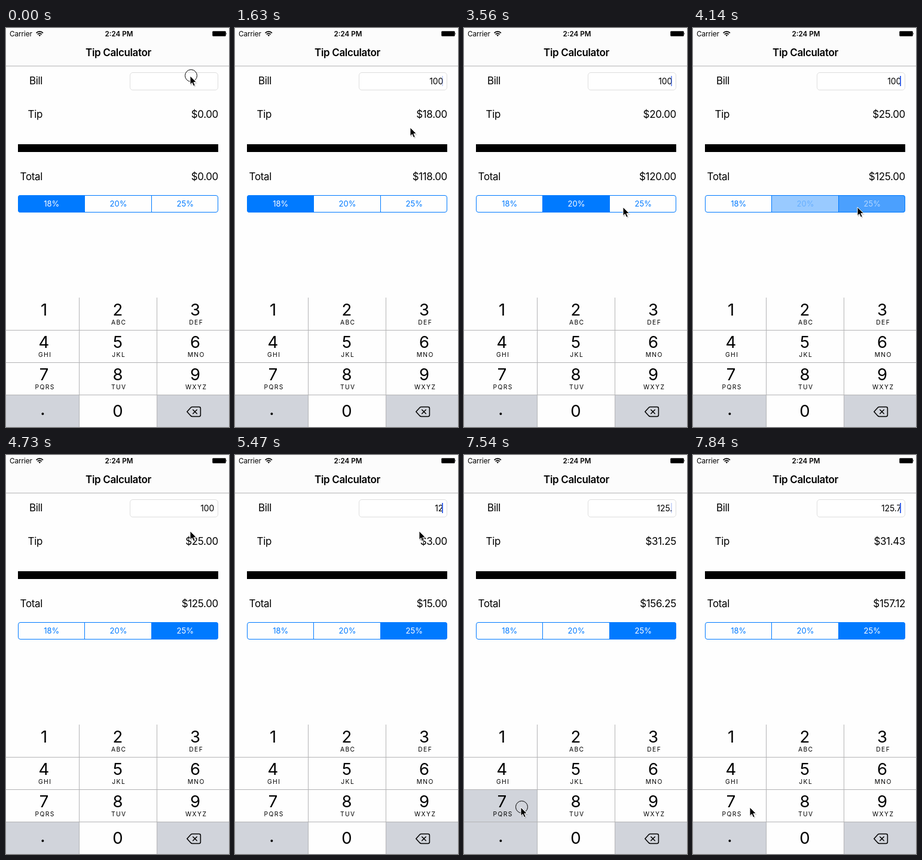
An HTML page that plays this animation: 373x666 px, repeating every 7990 ms.

```html
<!DOCTYPE html>
<html lang="en">
<head>
<meta charset="utf-8">
<title>Tip Calculator</title>
<style>
  html, body { margin: 0; width: 100%; height: 100%; overflow: hidden; background: #fefefe; }
  svg { display: block; width: 373px; height: 666px; }
  text { font-family: Inter, Roboto, sans-serif; }
  .label { font-size: 17px; letter-spacing: -.35px; text-anchor: end; }
  .bill { font-size: 14px; letter-spacing: -.1px; text-anchor: end; }
  .seg, .digit, .abc { text-anchor: middle; }
  .seg { font-size: 13px; }
  .digit { font-size: 27.5px; }
  .abc { font-size: 10.3px; letter-spacing: 1.4px; }
  .line { fill: none; stroke: #b4b4b6; }
</style>
</head>
<body>
<svg viewBox="0 0 373 666">
  <rect width="373" height="666" fill="#fefefe"/>

  <rect width="373" height="63" fill="#fcfcfc"/>
  <path class="line" d="M0 63.5H373"/>
  <text x="6" y="13.5" font-size="11.8" letter-spacing="-.1">Carrier</text>
  <g fill="none" stroke="#000" stroke-width="1.7">
    <path d="M50.6 8.3a8 8 0 0 1 11.3 0M52.8 10.6a4.8 4.8 0 0 1 6.9 0"/>
    <path d="M56.25 14l-1.9-1.9a2.7 2.7 0 0 1 3.8 0z" fill="#000" stroke="none"/>
  </g>
  <text x="189" y="13.5" font-size="11.6" font-weight="600" text-anchor="middle">2:24 PM</text>
  <rect x="345.5" y="5.5" width="22" height="8" rx="1" stroke="#000" stroke-opacity=".5"/>
  <path d="M368.3 7.7q1.6 1.8 0 3.6z"/>
  <text x="188" y="47" font-size="17" font-weight="600" letter-spacing="-.35" text-anchor="middle">Tip Calculator</text>

  <text class="label" x="61" y="94">Bill</text>
  <text class="label" x="61" y="150">Tip</text>
  <text class="label" x="61" y="254">Total</text>
  <rect x="207.5" y="74.5" width="147" height="29" rx="4.5" fill="#fff" stroke="#dedede"/>
  <text class="bill" id="bill" x="348.3" y="94"></text>
  <rect id="caret" x="346" y="80" width="2" height="17" fill="#4169e8"/>
  <text class="label" id="tip" x="355" y="150"></text>
  <text class="label" id="total" x="355" y="254"></text>
  <rect x="20" y="194" width="335" height="13"/>

  <clipPath id="round"><rect x="20" y="279" width="335" height="29" rx="4"/></clipPath>
  <g id="fills" clip-path="url(#round)" fill="#007aff"></g>
  <rect x="20.5" y="279.5" width="334" height="28" rx="3.5" fill="none" stroke="#007aff"/>
  <path d="M131.5 280V307M243.5 280V307" stroke="#007aff"/>
  <g id="names"></g>

  <path d="M0 613H122V666H0zM253 613H373V666H253z" fill="#d1d4db"/>
  <rect id="seven" y="559" width="122" height="53" fill="#d1d4db"/>
  <path class="line" d="M0 504.5H373M0 558.5H373M0 612.5H373M122.5 450V666M252.5 450V666"/>
  <g id="keypad"></g>
  <g fill="none" stroke="#000" stroke-width="1.5" stroke-linejoin="round" stroke-linecap="round">
    <path d="M302.8 640.5l6.4-7q1-1 2.4-1H323q2.4 0 2.4 2.4V646q0 2.4-2.4 2.4H311.6q-1.4 0-2.4-1z"/>
    <path d="M312.7 637.2l6.6 6.6m0-6.6l-6.6 6.6"/>
  </g>

  <g id="pointer">
    <circle id="ring" cx="1.5" cy="-.5" r="10" fill="none" stroke="#000"/>
    <path d="M1 2V16.5l3.5-3 2.3 5 2.5-1-2.2-5H12z" opacity=".18"/>
    <path d="M0 0V14.5l3.3-3.1 2.4 5.5 2.6-1.1-2.4-5.3H10.5z" stroke="#fff" stroke-linejoin="round"/>
  </g>
</svg>
<script>
  const LOOP = 7990, TICK = 148;
  const $ = id => document.getElementById(id);

  // Times are in ticks; '<' deletes a digit.
  const keys = '100<<25.7', keyTimes = [4, 6, 7, 35, 36, 37, 39, 47, 52];
  const picks = [-9, 16, 28], rates = [18, 20, 25];
  const clicks = [0, 15, 27, 46, 51];
  const start = { x: 308, y: 80 };
  const moves = [
    { from: 10, to: 14.5, x: 186, y: 297 },
    { from: 20, to: 25, x: 275, y: 299 },
    { from: 29, to: 32, x: 308, y: 127 },
    { from: 41, to: 45.9, x: 77, y: 637 },
    { from: 47, to: 50, x: 95, y: 588 }
  ];

  const clamp = v => Math.max(0, Math.min(1, v));
  const lerp = (a, b, f) => a + (b - a) * f;
  const smooth = u => u * u * (3 - 2 * u);
  const easeOut = u => 1 - (1 - u) ** 2;
  const money = cents => '$' + (cents / 100).toFixed(2);

  function add(parent, tag, attrs, text = '') {
    const el = document.createElementNS('http://www.w3.org/2000/svg', tag);
    for (const name in attrs) el.setAttribute(name, attrs[name]);
    el.textContent = text;
    return parent.appendChild(el);
  }

  const segments = rates.map((rate, i) => ({
    fill: add($('fills'), 'rect', { x: 20 + i * 111.5, y: 279, width: 112, height: 29 }),
    name: add($('names'), 'text', { class: 'seg', x: 76.2 + i * 111.8, y: 298 }, rate + '%')
  }));

  const centers = [63.5, 187, 316.5];
  ['', 'ABC', 'DEF', 'GHI', 'JKL', 'MNO', 'PQRS', 'TUV', 'WXYZ'].forEach((abc, i) => {
    const x = centers[i % 3], y = 480 + 54 * Math.floor(i / 3);
    add($('keypad'), 'text', { class: 'digit', x, y }, i + 1);
    add($('keypad'), 'text', { class: 'abc', x: x + 1.7, y: y + 15 }, abc);
  });
  add($('keypad'), 'text', { class: 'digit', x: 187, y: 649 }, '0');
  add($('keypad'), 'text', { class: 'digit', x: 61.5, y: 646, 'font-weight': 500 }, '.');

  const billAt = k => [...keys].reduce((bill, key, i) =>
    keyTimes[i] > k ? bill : key === '<' ? bill.slice(0, -1) : bill + key, '');

  // The pointer swings quickly in y and more evenly in x.
  function pointerAt(k) {
    return moves.reduce((p, m) => {
      const u = clamp((k - m.from) / (m.to - m.from));
      return { x: lerp(p.x, m.x, smooth(u)), y: lerp(p.y, m.y, easeOut(u)) };
    }, start);
  }

  // The caret blinks once a second, restarting at each key press.
  function caretAt(k) {
    const key = keyTimes.filter(t => t <= k).pop() || 0;
    const phase = (k - key) * TICK % 1000;
    if (k < 2) return k / 2;
    return phase < 800 ? clamp((640 - phase) / 190) : clamp((phase - 900) / 90);
  }

  // A picked segment fills up while the one before it fades.
  function levelAt(i, k) {
    const on = clamp(.7 + .3 * (k - picks[i]));
    const off = clamp(.4 - .35 * (k - picks[i + 1]));
    return k < picks[i] ? 0 : k >= picks[i + 1] ? off : on;
  }

  function draw(k) {
    const bill = billAt(k);
    const rate = rates[picks.filter(t => t <= k).length - 1];
    $('bill').textContent = bill;
    $('tip').textContent = money(Math.round(bill * rate + 1e-6));
    $('total').textContent = money(Math.floor(bill * (100 + rate) + 1e-6));
    $('caret').setAttribute('opacity', caretAt(k));

    segments.forEach(({ fill, name }, i) => {
      const level = levelAt(i, k);
      fill.setAttribute('opacity', level);
      name.setAttribute('fill', `rgb(${lerp(0, 255, level)},${lerp(122, 255, level)},255)`);
    });

    const { x, y } = pointerAt(k);
    $('pointer').setAttribute('transform', `translate(${Math.round(x)},${Math.round(y)})`);
    $('ring').setAttribute('opacity', clicks.includes(k) ? 1 : 0);
    $('seven').setAttribute('opacity', k === clicks[4] ? 1 : 0);
  }

  let shown = -1;
  function frame(now) {
    const k = Math.min(53, Math.floor(now % LOOP / TICK + .08));
    if (k !== shown) draw(shown = k);
    requestAnimationFrame(frame);
  }
  frame(performance.now());
</script>
</body>
</html>
```
